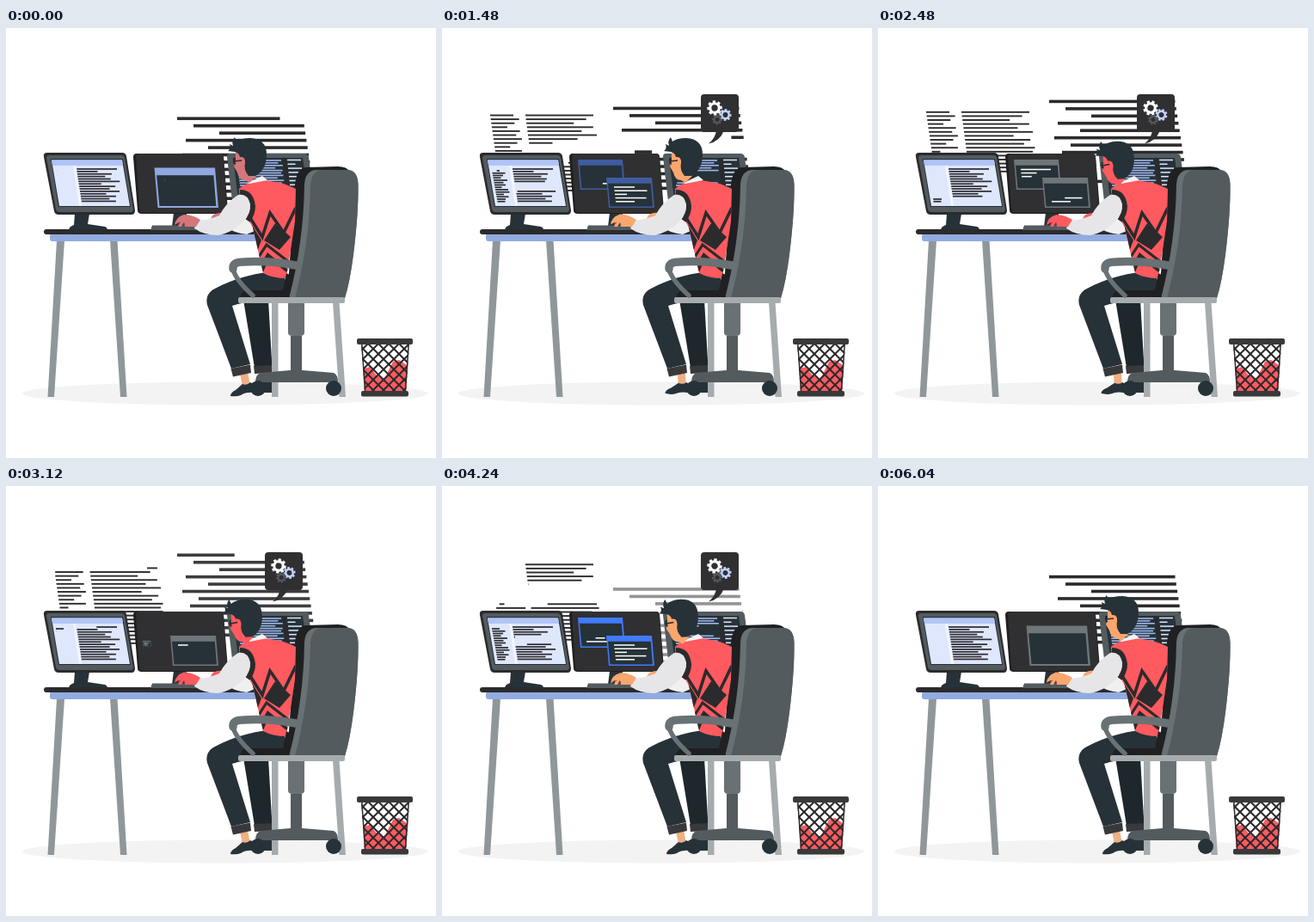
An HTML page with a canvas that plays this animation: 500 px wide and 500 px high, repeating every 6.08 s.

```html
<!DOCTYPE html>
<html lang="en">
<head>
<meta charset="utf-8">
<title>Programmer at work</title>
<style>
html, body { margin: 0; width: 100%; height: 100%; overflow: hidden; background: #fff; }
canvas { display: block; width: 500px; height: 500px; }
</style>
</head>
<body>
<canvas id="stage" width="500" height="500"></canvas>
<script>
const g = document.getElementById('stage').getContext('2d');
const LOOP = 6080, HALF = LOOP / 2;
const INK = '#2b2b2d', NAVY = '#263238', STEEL = '#535b5e', SHINE = '#687174', RED = '#ff5a5f', GREY = '#8f979a';

const clamp = v => Math.max(0, Math.min(1, v));
const smooth = v => { v = clamp(v); return v * v * (3 - 2 * v); };
const ramp = (t, a, b) => smooth((t - a) / (b - a));
const fill = (color, d) => { g.fillStyle = color; g.fill(new Path2D(d)); };
const line = (color, w, d) => { g.strokeStyle = color; g.lineWidth = w; g.stroke(new Path2D(d)); };
const disc = (color, x, y, rx, ry = rx) => {
  g.fillStyle = color;
  g.beginPath();
  g.ellipse(x, y, rx, ry, 0, 0, 7);
  g.fill();
};
const box = (color, x, y, w, h, r = 0) => {
  g.fillStyle = color;
  g.beginPath();
  g.roundRect(x, y, w, h, r);
  g.fill();
};
const group = draw => { g.save(); draw(); g.restore(); };
const step = (t, keys) => keys.filter(k => k[0] <= t).pop()[1];
function tween(t, keys) {
  const i = Math.max(1, keys.findIndex(k => k[0] > t));
  const [a, b] = [keys[i - 1], keys[i]];
  return a[1] + (b[1] - a[1]) * ramp(t, a[0], b[0]);
}

// Visible parts of row i, given how many rows have been typed and erased
const retyped = (typed, erased) => i => [[0, clamp(typed - i)], [clamp(erased - i), 1]];
const typedOnce = (typed, erased) => i => [[clamp(erased - i), clamp(typed - i)]];

function rows(color, h, y, pitch, list, spans, flip) {
  g.fillStyle = color;
  list.forEach(([x0, x1], i) => {
    for (let [a, b] of spans(i)) {
      if (b <= a) continue;
      if (flip) [a, b] = [1 - b, 1 - a];
      g.fillRect(x0 + (x1 - x0) * a, y + i * pitch - h / 2, (x1 - x0) * (b - a), h);
    }
  });
}
// Rows that lean with the screens: start x, shift per row, widths
const slant = (x, dx, widths) => widths.map((w, i) => [x + dx * i, x + dx * i + w]);

const sideRows = slant(56, .65, [27, 33, 27, 18, 32, 27, 33, 27, 18, 31, 10, 34]);
const wideRows = slant(97, .6, [79, 70, 55, 77, 63, 80, 57, 76, 68, 80, 77, 79, 70, 82, 78, 80, 76, 82, 79, 80]);
const backRows = [199, 218, 248, 209, 235, 205, 224, 214, 240, 210, 228, 216].map((x, i) => [x, 345.500 + i * 1.3]);
const paneRows = slant(58, .5, [9, 15, 12, 9, 16, 11, 13, 8, 15, 16, 9, 14, 10, 9]);
const codeRows = slant(82, .45, [47, 24, 40, 32, 38, 48, 26, 42, 35, 46, 30, 41, 33, 40]);
const winRowsA = slant(166, .5, [35, 18, 30, 22, 24]);
const winRowsB = slant(200, .5, [24, 38, 14, 36, 22]);

function floatingText(t, p) {
  const u = (t - 3240 + LOOP) % LOOP;
  group(() => {
    g.globalAlpha = Math.min(1, u / 2000, (LOOP - u) / 130);
    rows(INK, 3.6, 128 - .008 * u, 8.45, backRows,
      retyped(Math.max(0, (p - 450) * .004), (p + 40) * .0045), true);
  });
  group(() => {
    g.globalAlpha = ramp(t, 100, 500) * (1 - ramp(t, 5500, 5950));
    const y = 107 - .0037 * t;
    rows(INK, 1.9, y, 4.6, sideRows, typedOnce(99, (t - 3000) * .0084));
    rows(INK, 1.9, y, 4.6, wideRows, retyped((p - 605) * .0084, (p + 20) * .0084));
  });
}

function leftMonitor(p) {
  fill(NAVY, 'M80 216H97L95 228L115 231Q118 232 118 235H73Q73 231 79 229Z');
  fill(INK, 'M48 145H135Q139 145 140 149L150 212Q150 217 146 217H61Q57 217 56 213L44 150Q43 145 48 145Z');
  fill(STEEL, 'M50 148H134Q137 148 138 151L148 211Q148 214 145 214H62Q59 214 58 211L47 151Q47 148 50 148Z');
  fill(NAVY, 'M52 152H136L145 208H61Z');
  fill('#dfe7fd', 'M53 153.500H135L144 207H62Z');
  fill('#f3f6ff', 'M78 160H81L88 207H85Z');
  fill('#afc4f8', 'M53 153.500H135L136 160H54Z');
  rows(INK, 1.7, 166, 2.75, paneRows, typedOnce(p * .0125, (p - 1426) * .0114));
  rows(INK, 1.7, 164, 2.88, codeRows, retyped((p - 540) * .0061, p * .0061));
}

function windowFrame(x, y, w, h, title) {
  const s = h * .085, bar = h * .19;
  fill(title, `M${x} ${y}H${x + w}L${x + w + s} ${y + h}H${x + s}Z`);
  fill(NAVY, `M${x + 2} ${y + bar}H${x + w - 1.2}L${x + w + s - 2} ${y + h - 1.5}H${x + s + 1.5}Z`);
}

function middleMonitor(t, p) {
  fill(NAVY, 'M195 215H210L210 231H193Z');
  fill('#1f1f21', 'M152 146H249Q253 146 253 150L258 212Q258 216 254 216H158Q153 216 153 212L148 150Q148 146 152 146Z');
  fill('#303032', 'M156 146H249Q252 146 253 150L257 212Q257 215 254 215H160Q156 215 155 211L151 150Q151 146 156 146Z');
  const title = step(t, [[0, '#8fa8e0'], [40, '#6e7679'], [700, '#3f5ca0'], [2000, '#6e7679'], [3700, '#407bff'], [4700, '#6e7679']]);
  const open = ramp(p, 0, 300) * (1 - ramp(p, 2750, 2950));
  if (open > .01) group(() => {
    g.translate(159, 186);
    g.scale(open, open);
    g.translate(-159, -186);
    windowFrame(158, 153, 52, 35, title);
    rows('#fff', 1.5, 164.500, 4.1, winRowsA, retyped((p - 1950) * .0045, Math.max(0, (p - 440) * .0046)));
  });
  const size = 1 + .33 * (1 - ramp(t, 300, 700) + ramp(t, 4500, 4800));
  // The small size is already reached soon after the second half begins
  group(() => {
    g.translate(247, 209);
    g.scale(size, size);
    g.translate(-247, -209);
    windowFrame(191, 174, 53, 35, title);
    rows('#fff', 1.5, 185, 4.2, winRowsB, typedOnce(p * .006, (p - 1600) * .0039));
  });
}

function rightMonitor(p) {
  fill(STEEL, 'M260 146H347Q351 146 352 150L360 213H268Q264 213 264 210L257 150Q257 146 260 146Z');
  fill(NAVY, 'M264 151H345L353 207H271Z');
  const spans = retyped(Math.max(0, (p - 600) * .0061), p * .0061);
  rows('#9fb6ec', 1.6, 154, 2.9, slant(268, .4, [52, 48, 53, 44, 52, 50, 52, 45, 52, 49, 53]), spans);
  fill(INK, 'M321 151H326L331 190H326Z');
  rows('#dfe7fd', 1.5, 153.500, 4.8, slant(327, .5, [16, 9, 16, 14, 9, 16, 12]), () => [[0, 1]]);
}

function desk() {
  fill(GREY, 'M59 247H68L56 429H48.500ZM121 247H129.500L140.500 429H133Z');
  box('#92abe0', 51, 239, 240, 9, 3);
  box(INK, 44, 234, 247, 6, 3);
  fill(STEEL, 'M170 229.500H226V235H168Z');
}

function gear(color, x, y, r, angle) {
  group(() => {
    g.translate(x, y);
    g.rotate(angle);
    g.strokeStyle = color;
    g.lineWidth = r * .36;
    g.beginPath();
    g.arc(0, 0, r * .6, 0, 7);
    g.stroke();
    for (let i = 0; i < 8; i++) {
      g.rotate(Math.PI / 4);
      line(color, r * .38, `M${r * .7} 0H${r}`);
    }
  });
}

function bubble(t) {
  const s = ramp(t, 350, 900);
  if (s < .01) return;
  group(() => {
    g.globalAlpha = 1 - ramp(t, 5550, 5980);
    g.translate(311, 134);
    g.scale(s, s);
    g.translate(-311, -134);
    box('#303033', 301, 77, 44, 44, 4);
    fill('#303033', 'M319 119H328Q323 132 310 134.500Q318 128 319 119Z');
    const a = t / LOOP * Math.PI * 4;
    gear('#fff', 317, 93, 8.7, a);
    gear('#c3d2fa', 329.500, 101, 7, -a);
    gear('#55585b', 320, 106.500, 6, -a);
  });
}

function legs(t) {
  const tapping = t < 3000 || (t > 5000 && t < 6000);
  const tap = tapping ? (1 - Math.cos(t * Math.PI / 500)) / 2 : 0;
  fill(NAVY, 'M287 412L309 411Q311 417 311 424H285Z');
  fill('#1e282c', 'M276 316H305L309.500 395H289Z');
  fill('#39393b', 'M288 393L310.500 392L311 401L289 402Z');
  group(() => {
    g.translate(285, 414);
    g.rotate(tap * .13);
    g.translate(-285, -414);
    fill('#eeb083', 'M272 402L281 400L284 416H275Z');
    fill(NAVY, 'M261 428Q261 424 267 421L275 414Q280 416 284 412L288 414L288 424Q279 423 273 427Q268 429 261 428Z');
  });
  fill(NAVY, 'M322 282C292 284 265 291 243 303Q231 309 234 322L262 396L284 391L263 323Q285 316 330 314Z');
  fill('#39393b', 'M261.500 396L284 391.500L285 401L264 405.500Z');
}

function chairBack() {
  fill('#202022', 'M336 182Q338 163 349 162L386 161Q396 161 400 167L360 313H319L329 285Z');
  fill(SHINE, 'M347 182Q348 165 362 165H398Q409 166 409.500 182Q410 215 404 263Q400 295 394 314H329Q346 250 347 182Z');
  fill(STEEL, 'M354 182Q356 165 367 165H398Q409 166 409.500 182Q410 215 404 263Q400 295 394 314H336Q353 250 354 182Z');
}

function chairBase() {
  fill('#202022', 'M279 305H322L326 285L334 290L329 314H272Q273 307 279 305Z');
  fill('#a6abad', 'M309 319H316.500V429H309ZM380 319H387.500L395 429H387.500Z');
  fill(SHINE, 'M328 319H347V354Q347 358 342 358H333Q328 358 328 354Z');
  box(STEEL, 331, 358, 13, 44);
  fill(STEEL, 'M330 398H345L381 401Q386 403 386 412H290Q290 403 296 401Z');
  disc(NAVY, 293, 419, 9);
  disc(NAVY, 381, 419, 9);
  box('#a6abad', 270, 313, 124, 7, 2);
  g.lineCap = 'round';
  line(SHINE, 5.5, 'M264 281Q268 294 287 311');
  line(SHINE, 9.500, 'M337 276Q305 270 276 272Q263 272 264 280');
  g.lineCap = 'butt';
}

function torso(t, skin) {
  const lift = Math.sin(t / 65) * .6;
  fill(skin, `M238 222Q240 ${214 + lift} 252 215L256 222Z`);
  fill('#f0f0f1', 'M250 221L275 210L289 236L280 240Q264 238 255 231Z');
  const vest = 'M271 187Q279 179 300 177Q322 179 337 187L336 225L326 291Q310 291 299 285L287 232Q271 205 271 187Z';
  fill(RED, vest);
  group(() => {
    g.clip(new Path2D(vest));
    line(INK, 3.6, 'M284 221L298 243L307 215L323 238L337 209');
    fill(INK, 'M313 227L331 243L318 258L300 247ZM286 229L297 247L292 260Z');
    line(INK, 3.2, 'M294 266L303 252L330 273');
    fill(INK, 'M295 277L304 261L328 281L326 284L306 268L299 284Z');
  });
  fill('#f3f3f5', 'M281 180L298 172L304 177L283 181Z');
  line(INK, 6, 'M272 191Q285 191 287 207Q287 216 281 224');
  fill('#e6e6e8', 'M270 194Q281 192 284 205Q285 215 276 225Q263 238 247 241Q230 241 219 233L222 224Q237 223 248 218Q256 203 270 194Z');
  fill(skin, `M196 ${229 + lift}Q197 220 207 ${217 + lift}Q217 217 226 223L221 231L208 231L207 226L204 231H200Q202 227 201 226Z`);
  line('#8f3f45', .9, `M200 ${230 + lift}Q200 227 203 226M207 231V227`);
}

function head(t, skin) {
  const lean = tween(t, [[0, 0], [1500, 0], [2300, 1], [4300, 1], [5300, .25], [LOOP, 0]]);
  group(() => {
    g.translate(287 - 3 * lean, 179 + 3.5 * lean);
    g.rotate(-.07 * lean);
    g.translate(-287, -179);
    fill(skin, 'M267 143L284 145L291 172L283 180L278 177Q271 177 269 168L265 161L267 154Z');
    fill(NAVY, 'M258 143Q262 140 260 135L264 137Q262 131 266 127L268 132Q273 128 284 128Q303 129 303 147Q303 165 290 172L282 172Q276 165 278 156Q278 149 272 150Q271 145 266 144Z');
    disc(skin, 274.500, 156, 3.4, 5.5);
    line(INK, 1.6, 'M265 155L274 154');
    line(INK, 1.8, 'M266 151Q263 156 267 158');
  });
}

function bin() {
  group(() => {
    g.clip(new Path2D('M413 367H469L465 424H417Z'));
    fill(RED, 'M413 397L423 394L431 404L440 408L450 388L457 386L469 394V424H413Z');
    for (let x = 349; x < 540; x += 12)
      line(INK, 2, `M${x} 367l57 57M${x} 367l-57 57`);
    line(INK, 3, 'M413 367L417 424M469 367L465 424');
  });
  box('#39393b', 408, 361, 65, 7, 2);
  box('#39393b', 413, 422, 55, 6.5, 2);
}

function draw(t) {
  const p = t % HALF;
  const skin = step(t, [[0, '#d4777b'], [40, '#f9a66f'], [2000, RED], [3600, '#f9a66f']]);
  g.fillStyle = '#fff';
  g.fillRect(0, 0, 500, 500);
  disc('#f3f3f3', 255, 425, 236, 13.500);
  floatingText(t, p);
  rightMonitor(p);
  middleMonitor(t, p);
  leftMonitor(p);
  bubble(t);
  desk();
  chairBack();
  legs(t);
  torso(t, skin);
  head(t, skin);
  chairBase();
  bin();
}

const start = performance.now();
function tick() {
  draw((performance.now() - start) % LOOP);
  requestAnimationFrame(tick);
}
tick();
</script>
</body>
</html>
```
